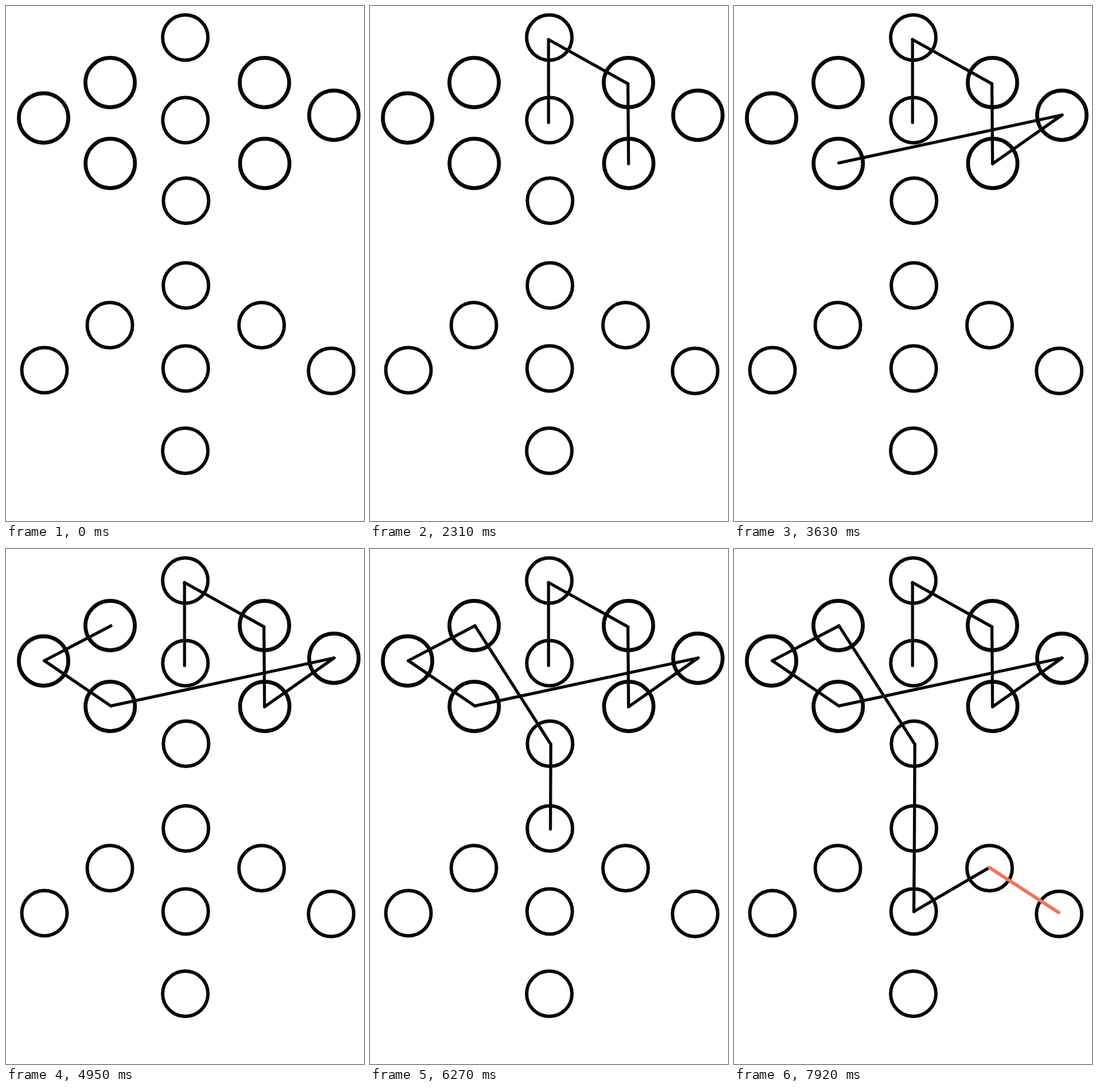
Recreate the animation shown at these times as an HTML page with a canvas. Size 624 px wide and 898 px high, loop 8000 ms.

```html
<!DOCTYPE html>
<html lang="en">
<head>
<meta charset="utf-8">
<title>Connected circles</title>
<style>
  html, body { margin: 0; width: 100%; height: 100%; overflow: hidden; background: #fff; }
  canvas { display: block; }
</style>
</head>
<body>
<canvas id="stage" width="624" height="898"></canvas>
<script>
const ctx = document.getElementById('stage').getContext('2d');
const LOOP = 8000, STEP = 660, FLASH = STEP / 2;
const AXIS = 313, CROWN = 300;
const INK = '#080708', RED = '#ee7660';

// Circle centres, in the order in which the line visits them.
const dots = [
  [312.7, 199], [312.5, 55], [450.5, 133.5], [451, 274.5],
  [571.5, 190.5], [181.7, 274.5], [65.5, 195.2], [181.5, 133.5],
  [313.8, 339.5], [313.6, 487.3], [313.2, 632], [445.5, 556.5],
  [566.7, 636.3], [312.5, 775.5], [67, 635], [181, 556.5]
];

// Circles beside the axis in the upper half are larger.
function ring([x, y]) {
  const large = y < CROWN && Math.abs(x - AXIS) > 9;
  ctx.lineWidth = large ? 6.7 : 6;
  ctx.beginPath();
  ctx.arc(x, y, large ? 43.1 : 39.5, 0, Math.PI * 2);
  ctx.stroke();
}

// The hand-drawn line sways a little around each centre.
function pen(i) {
  const [x, y] = dots[i];
  return [x - 1.5 * Math.cos(0.45 * i), y + 2.5 - 0.35 * i + 1.7 * Math.cos(0.7 * i)];
}

function link(i, color, width) {
  ctx.strokeStyle = color;
  ctx.lineWidth = width;
  ctx.beginPath();
  ctx.moveTo(...pen(i));
  ctx.lineTo(...pen(i + 1));
  ctx.stroke();
}

function draw(t) {
  ctx.fillStyle = '#fff';
  ctx.fillRect(0, 0, 624, 898);
  ctx.lineCap = 'round';
  ctx.strokeStyle = INK;
  dots.forEach(ring);

  // Each new link flashes red, then settles to black.
  const count = Math.floor(t / STEP);
  const fresh = t % STEP < FLASH;
  for (let i = 0; i < count; i++) {
    if (fresh && i === count - 1) link(i, RED, 6);
    else link(i, INK, 5.3);
  }
}

const start = performance.now();
function frame() {
  draw((performance.now() - start) % LOOP);
  requestAnimationFrame(frame);
}
frame();
</script>
</body>
</html>
```
